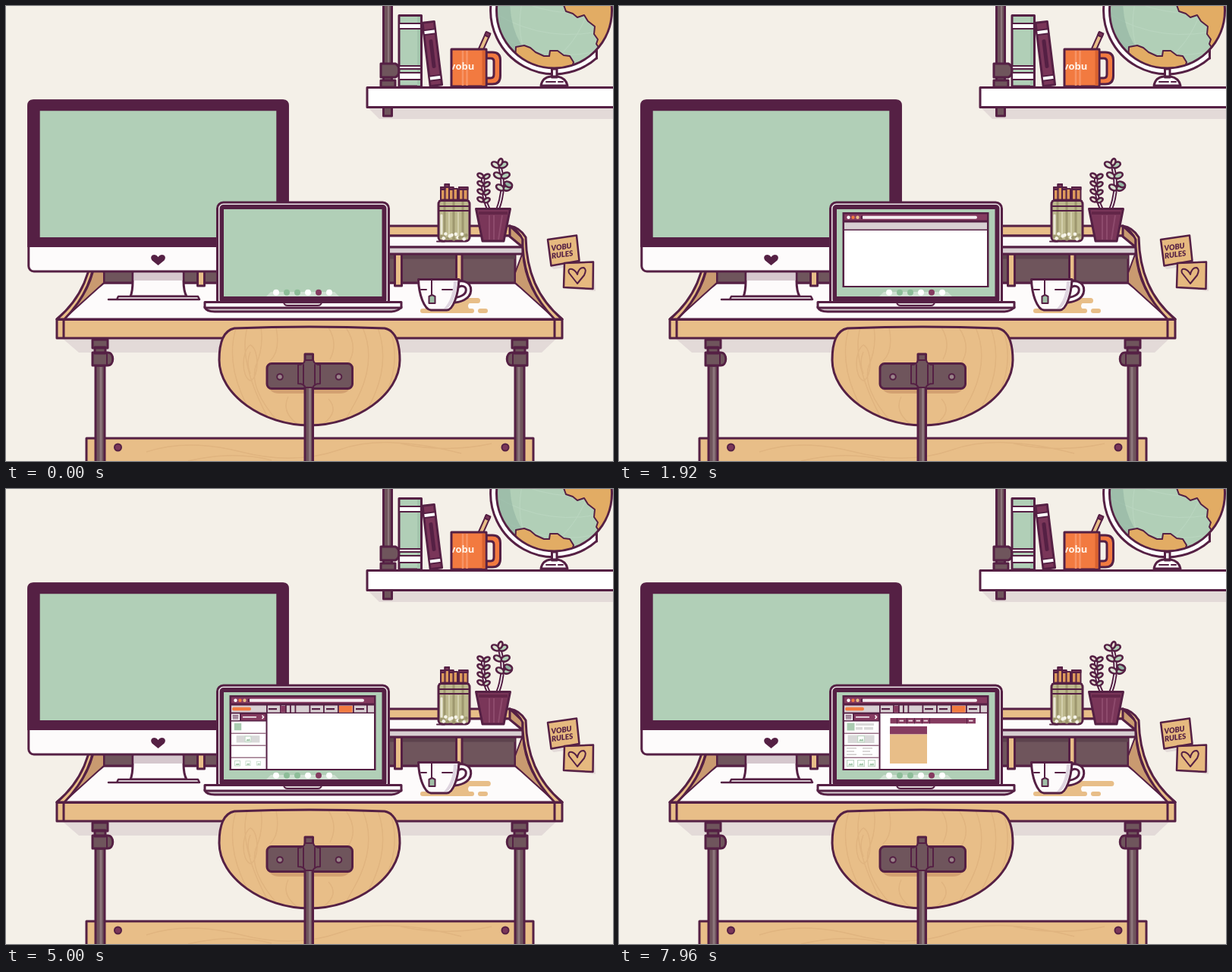
These frames come from a looping animation (800 px wide and 600 px high, 8000 ms). An HTML page:

```html
<!DOCTYPE html>
<html lang="en">
<head>
<meta charset="utf-8">
<title>Desk</title>
<style>
html, body { margin: 0; width: 100%; height: 100%; overflow: hidden; background: #f4f0e8; }
svg { display: block; width: 100vw; height: 100vh; }
.o { stroke: #552044; stroke-width: 3; stroke-linejoin: round; stroke-linecap: round; }
.t { stroke: #552044; stroke-width: 2; stroke-linejoin: round; stroke-linecap: round; }
.d { fill: #552044; }
.w { fill: #fff; }
.c { fill: #fdfbfb; }
.g { fill: #b1cfb7; }
.n { fill: #e8be88; }
.note { fill: #e6b97f; stroke-width: 2.5; }
.s { fill: #c99a70; }
.b { fill: #6f555c; }
.p { fill: #853b60; }
.q { fill: #7a3659; }
.r { fill: #f27a40; }
.e { fill: #d8cfd2; }
.sh { fill: #e3dad8; }
.l { fill: none; }
.grain { fill: none; stroke: #e0b47f; stroke-width: 1.5; }
.anim { transform-box: fill-box; transform-origin: 0 50%; }
.mid { transform-origin: 50% 50%; }
.top { transform-origin: 50% 0; }
</style>
</head>
<body>
<svg viewBox="0 0 800 600">
<defs>
  <clipPath id="globeClip"><circle cx="722.5" cy="6" r="76"/></clipPath>
  <clipPath id="mugClip"><rect x="588.5" y="59" width="43" height="46"/></clipPath>
  <clipPath id="seatClip"><path id="seat" d="M301 425Q400 421 499 425C514 428 519 445 519 467C519 512 462 553 400 553C338 553 281 512 281 467C281 445 286 428 301 425Z"/></clipPath>
  <path id="ring" d="M641.4 -8.3A82.500 82.500 0 0 0 778.3 66.7"/>
  <path id="handle" d="M592 370C599 363 610 366 609.500 375C609 384 598 388 587 388"/>
  <path id="stems" d="M636 268Q627 250 629 222M648 268Q660 238 649 206"/>
  <g id="leg">
    <path class="b o" d="M118 474H130V604H118Z"/>
    <path d="M125 476V600" stroke="#8d777c" stroke-width="3"/>
    <path class="b o" d="M117 450H131V458H117ZM114 440H134V451H114ZM114 457H134C143 457 143 474 134 474H114Z"/>
    <path class="t l" d="M133 458V473"/>
  </g>
  <g id="side">
    <path class="s t" d="M681 325L671 352V365L724 413C697 388 683 358 681 325Z"/>
    <path class="s o" d="M664 290L681 306V318L664 304Z"/>
    <path class="n o" d="M664 290Q677 292 685 305C686 350 700 385 733 413H723C696 385 683 355 681 317V308Q676 297 664 290Z"/>
  </g>
  <g id="pic">
    <rect width="10" height="9.5" fill="#c2d8c6"/>
    <rect x="1.2" y="1.2" width="7.6" height="7.1" fill="#fff"/>
    <path d="M2 7.5L4 4.5L5.5 6L7 4L8.3 7.5Z" fill="#9dc4a5"/>
  </g>
</defs>
<rect width="800" height="600" fill="#f4f0e8"/>

<!-- wall shelf -->
<path class="sh" d="M477 134H800V149H492Z"/>
<path class="b o" d="M497.5 -4H508.5V145H497.5Z"/>
<path d="M504 0V76" stroke="#8d777c" stroke-width="2"/>
<path class="b o" d="M494 76H513Q518 78 518 85T513 94H494ZM494 98H513V107H494Z"/>
<path class="w o" d="M476 107.5H806V133.5H476Z"/>

<!-- books -->
<path class="g o" d="M518 12.5H547.5V106H518Z"/>
<path d="M544 14V105" stroke="#a3c5ac" stroke-width="4"/>
<path class="w t" d="M518 23H547V30H518ZM518 79H547V83H518ZM518 88H547V97H518Z"/>
<g transform="rotate(-7 562 63)">
  <path class="q o" d="M554 21H569.5V105H554Z"/>
  <path class="w t" d="M554 31H569.5V37H554ZM554 92H569.5V98H554Z"/>
  <rect class="d" x="559.5" y="44" width="5" height="38" rx="2"/>
</g>

<!-- mug -->
<g transform="rotate(24 630 48)">
  <path class="n t" d="M627 35H633V60H627Z"/><path class="q t" d="M627 34H633V39H627Z"/>
</g>
<path class="r o" d="M633 61H641Q651.5 61 651.5 71V92Q651.5 103 641 103H633V95H639Q643 95 643 90V73Q643 69 639 69H633Z"/>
<path class="r o" d="M587 57H633V106H587Z"/>
<path d="M602 59V105M607.5 59V105" stroke="#f79465" stroke-width="2.500"/>
<path d="M629.500 59V105" stroke="#d9622f" stroke-width="4"/>
<text x="585" y="84" clip-path="url(#mugClip)" font-family="'Open Sans', sans-serif" font-weight="700" font-size="13" fill="#fff3e8">vobu</text>

<!-- globe -->
<use href="#ring" class="l" stroke="#552044" stroke-width="6"/>
<use href="#ring" class="l" stroke="#fff" stroke-width="7" transform="translate(722.5 6) scale(.96) translate(-722.5 -6)"/>
<path class="o l" d="M778.5 58V69"/>
<g clip-path="url(#globeClip)">
  <rect class="g" x="640" y="-80" width="165" height="165"/>
  <g class="l" stroke="#bad6c0">
    <ellipse cx="722" cy="-15" rx="44" ry="92" transform="rotate(18 722 4)"/>
    <path d="M645 10Q715 52 798 30M650 -20Q720 22 800 4M665 47Q725 75 785 58"/>
  </g>
  <path d="M640 -10V90H735Q664 70 664 -10Z" fill="#92b4a2" opacity=".6"/>
  <path class="t" fill="#e2ac64" d="M734 -4L738 7L747 10L753 15L762 12L767 20L776 27L775 37L780 44L778 50L782 56L810 40V-4ZM672 54L683 52L691 55L698 61L709 66L716 66L717 59L727 59L735 65L743 66L748 74L744 88H670Z"/>
  <path d="M735 82Q788 70 799 5V82Z" fill="#d59b56" opacity=".3"/>
</g>
<circle class="o l" cx="722.5" cy="6" r="76"/>
<path class="w o" d="M719.500 83H726V94H719.500ZM705 105Q707 94 718 93H727Q738 95 740 105Z"/>
<path class="t l" d="M712 100H724M728 100H734"/>

<!-- desk frame -->
<path class="sh" d="M74 438H726L706 457H96Z"/>
<path class="n o" d="M106 570H695V606H106Z"/>
<path class="grain" d="M185 588Q240 570 310 588T440 585T600 590M240 600Q300 586 350 599M520 577Q580 590 640 577"/>
<circle class="q t" cx="147.500" cy="582" r="4.500"/><circle class="q t" cx="658" cy="582" r="4.500"/>
<use href="#leg"/><use href="#leg" transform="matrix(-1 0 0 1 801 0)"/>

<!-- desk -->
<path class="c o" d="M67 413L129 365H671L733 413Z"/>
<path class="n o" d="M400 290H664L674 303H400Z"/>
<path class="c o" d="M400 303H665L681 318H400Z"/>
<path class="b o" d="M129 327H671V365H129Z"/>
<path d="M129 331H671" stroke="#5d434d" stroke-width="5"/>
<path class="n o" d="M252.500 327H261.500V369H252.500ZM512.500 327H521.500V369H512.500ZM593.500 327H601V362H593.500Z"/>
<path class="e o" d="M400 318H681V327H400Z"/>
<use href="#side"/><use href="#side" transform="matrix(-1 0 0 1 800 0)"/>
<path class="n o" d="M67 413.500H733V438H67ZM76 414V438M723 414V438"/>

<!-- monitor -->
<path class="c o" d="M167 350V362Q167 376 164 383H238Q234 376 234 362V350Z"/>
<path d="M168.500 351H232.500V362H168.500Z" fill="#d5c7cd"/>
<path class="c o" d="M148 383H253L255 387H146ZM135 387H146" style="stroke-width:2.500"/>
<rect class="c o" x="29.800" y="125" width="341.500" height="225" rx="7"/>
<path class="d" d="M28.200 318V131Q28.200 123.300 36 123.300H365Q372.800 123.300 372.800 131V318Z"/>
<path class="g" d="M44.700 138.300H356.300V305H44.700Z"/>
<path class="d" d="M200.500 342L192.500 335.500Q189.500 331 193 328.500Q197.500 326.500 200.500 331Q203.500 326.500 208 328.500Q211.500 331 208.500 335.500Z"/>

<!-- pencil jar -->
<path class="t" d="M568 310.500H578"/>
<path class="t" fill="#dd9a5c" d="M573 239H578.500V258H573ZM578.500 235H584V258H578.500ZM584 239H589.500V258H584ZM589.500 241H595V258H589.500ZM597 239H602.500V258H597ZM602.500 239H608.500V258H602.500Z"/>
<path class="q t" d="M573 239H578.500V242H573ZM578.500 235H584V239H578.500ZM584 239H589.500V242H584ZM597 239H608.500V242H597Z"/>
<rect class="o" x="570" y="256" width="41" height="54" rx="5" fill="#bdb88d"/>
<path d="M578 258V306M590 258V306M602 258V306" stroke="#9e976f" stroke-width="3"/>
<path d="M584 272V305M596 272V305" stroke="#d3cfac" stroke-width="2"/>
<path d="M574 276V300" stroke="#e9e7d5" stroke-width="3" stroke-linecap="round"/>
<g id="pebbles"></g>
<path class="t l" d="M571 257H610M571 264H610M571 270H610"/>

<!-- plant -->
<use href="#stems" class="l" stroke="#552044" stroke-width="5.500"/>
<use href="#stems" class="l" stroke="#fff" stroke-width="1.500"/>
<g id="leaves"></g>
<path class="q o" d="M619.500 267.500H664.500L656 310H628Z"/>
<path d="M654 276L649 308M643 276V308M637 276V308" stroke="#8d4a6c" stroke-width="2"/>
<path d="M623 273H661" stroke="#632648" stroke-width="4"/>

<!-- notes -->
<path class="sh" d="M718 344L757 338V342L722 347ZM738 373L777 376L775 340Z"/>
<path class="o note" d="M714 308L752 302.500L755.500 336L718.500 342.500Z"/>
<g class="d" transform="rotate(-8 734 322)" font-family="Lato, sans-serif" font-weight="900" font-style="italic" font-size="10">
  <text x="719" y="321">VOBU</text><text x="718" y="331">RULES</text>
</g>
<path class="o note" d="M736 339L774 337.500L773.500 373L735 371Z"/>
<path class="t l" d="M753 366L742 352Q740 346 746 347Q751 349 753 354Q755 345 761 345Q766 347 762 355Z"/>

<!-- spill and cup -->
<g class="n">
  <rect x="546" y="399" width="71" height="6" rx="3"/>
  <rect x="622" y="399" width="13" height="6" rx="3"/>
  <path d="M570 391H613Q609 392 609 395.500T613 400H570Z"/>
  <rect id="spill" x="580" y="385" width="45" height="7" rx="3.500"/>
</g>
<use href="#handle" class="l" stroke="#552044" stroke-width="9.500"/>
<use href="#handle" class="l" stroke="#fff" stroke-width="3.500"/>
<path class="c o" d="M543.500 360.500H597C596 382 589 401 581 401H560C551 400 544 380 543.500 360.500Z"/>
<path d="M590 363Q589 387 577 399H581Q592 392 595 363Z" fill="#dfd5e0"/>
<path class="t l" d="M561 361V381M547 374H554M575 374H588"/>
<path class="t" fill="#9fbfa6" d="M557.500 383L561.500 381L565.500 383V392H557.500Z"/>

<!-- laptop -->
<rect class="o" x="278.500" y="259" width="226" height="140" rx="8" fill="#efe9eb"/>
<rect class="d" x="281.500" y="262" width="220" height="130" rx="5"/>
<path class="g" d="M287 268H495.500V383H287Z"/>
<path d="M343 383L349 377H433L439 383Z" fill="#cfe0d2"/>
<g id="dock"></g>
<g id="win">
  <rect class="d" x="294.500" y="272" width="193" height="99"/>
  <rect class="p" x="297" y="274.500" width="188" height="8"/>
  <circle class="w" cx="302.500" cy="278.800" r="2.200"/><circle class="r" cx="308.500" cy="278.800" r="2.200"/><circle class="n" cx="314.500" cy="278.800" r="2.200"/>
  <rect x="320" y="276.800" width="152" height="4" rx="2" fill="#f5eef1"/>
  <rect class="d" x="319" y="276.500" width="2" height="4.500"/>
  <rect class="e" x="297" y="285.500" width="188" height="9"/>
  <rect class="w" x="297" y="296" width="188" height="73"/>
  <g id="nav"></g>
  <rect id="pill" class="r anim mid" x="298" y="287.700" width="25" height="4.600" rx="2.300"/>
  <g id="panel">
    <rect id="edge" class="d anim top" x="342.500" y="295" width="2" height="75"/>
    <g id="head" class="anim">
      <rect class="d" x="296" y="295.500" width="47" height="11"/>
      <rect class="w" x="297" y="296.500" width="11" height="8.500"/>
      <path class="t" d="M299 298.500H306M299 300.700H306M299 303H306" style="stroke-width:1.200"/>
      <rect class="p" x="310" y="297" width="32" height="8"/>
      <path class="l" d="M312 300.700H330M337.500 298.500L339.500 300.700L337.500 303" stroke="#fff" stroke-width="1.500"/>
    </g>
    <g fill="#9b7489">
      <rect class="anim rule" x="297" y="321.500" width="46" height="1.500"/>
      <rect class="anim rule" x="297" y="337.500" width="46" height="1.500"/>
      <rect class="anim rule" x="297" y="353.500" width="46" height="1.500"/>
    </g>
    <rect class="anim mid item" x="300.500" y="308.500" width="10" height="10" fill="#a9cbb0"/>
    <g class="anim mid item">
      <rect x="301.500" y="324.500" width="35" height="10.500" fill="#d9d9d9"/><use href="#pic" x="314" y="325"/>
    </g>
    <g class="anim mid item"><use href="#pic" x="300" y="357"/></g>
    <g class="anim mid item"><use href="#pic" x="314" y="357"/></g>
    <g class="anim mid item"><use href="#pic" x="328" y="357"/></g>
    <g id="lines"></g>
  </g>
  <rect id="bar" class="p anim" x="357.500" y="302" width="112.500" height="7.300"/>
  <g id="ticks"></g>
  <rect id="cardTop" class="p anim" x="357" y="313" width="49" height="10.500"/>
  <rect id="card" class="n anim top" x="357" y="323.500" width="49" height="38.500"/>
</g>
<path class="e o" d="M262 397H521Q517 403 506 403H275Q264 403 262 397Z"/>
<path class="c o" d="M262 390.500H521V398H262Z"/>
<path class="e t" d="M366 391H416Q415 395 411 395H371Q367 395 366 391Z"/>

<!-- chair -->
<use href="#seat" class="n"/>
<g class="grain" clip-path="url(#seatClip)">
  <path d="M303 425Q288 475 322 535M318 424Q305 470 348 548M336 424Q340 450 329 475Q320 505 360 550M322 447C310 455 310 489 322 494C334 490 334 452 322 447ZM322 456Q316 470 322 485M356 424Q362 455 348 468M372 515Q362 535 385 552M425 424Q438 445 427 466M448 424Q465 450 451 471M470 424Q490 470 459 525L445 550M490 424Q510 480 470 542M508 432Q522 480 490 532M425 518Q440 535 418 551"/>
</g>
<use href="#seat" class="o l"/>
<path d="M347 505H453Q449 511 440 511H360Q351 511 347 505Z" fill="#d3a171"/>
<rect class="b o" x="344" y="471.500" width="112.500" height="33" rx="6"/>
<path class="b o" d="M394 459H404.500V606H394Z"/>
<path d="M400.500 504V600" stroke="#8d777c" stroke-width="3"/>
<path class="b t" d="M385 473Q393 473 394 467H405Q406 473 414 473V498Q406 498 404.500 503H394.500Q393 498 385 498Z"/>
<path class="t l" d="M392 473V500M407 473V500"/>
<circle class="t" cx="361" cy="489" r="3.800" fill="#9a858a"/><circle class="t" cx="438.500" cy="489" r="3.800" fill="#9a858a"/>
</svg>
<script>
const LOOP = 8000;
const $ = id => document.getElementById(id);
const all = sel => [...document.querySelectorAll(sel)];

function add(parent, tag, attrs) {
  const el = document.createElementNS('http://www.w3.org/2000/svg', tag);
  for (const k in attrs) el.setAttribute(k, attrs[k]);
  return $(parent).appendChild(el);
}
const box = (parent, x, y, width, height, cls, fill) =>
  add(parent, 'rect', fill ? { x, y, width, height, class: cls, fill } : { x, y, width, height, class: cls });

// dock icons
const icons = ['#fff', '#8dbd98', '#8dbd98', '#fff', '#853b60', '#fff'].map((fill, i) =>
  add('dock', 'circle', { cx: 356 + i * 14, cy: 377.7, r: 4, fill }));

// pebbles
for (let i = 0; i < 13; i++)
  add('pebbles', 'circle', { cx: 574 + i * 2.7, cy: 304 + 3.5 * Math.sin(i * 2.4), r: 2.3,
    fill: i % 3 ? '#f5f3e8' : '#9e976f' });

// leaves in pairs along both stems
function leaf(x, y, angle, fill, size) {
  add('leaves', 'ellipse', { cx: size, cy: 0, rx: size, ry: size * .62, class: 'o', fill,
    style: 'stroke-width:2.6', transform: `translate(${x} ${y}) rotate(${angle})` });
}
for (let i = 0; i < 4; i++) {
  leaf(629, 226 + i * 10.5, 212, '#e9dcd2', 4.3);
  leaf(630, 227 + i * 10.5, -32, '#c9d8c4', 4.3);
}
for (const [x, y] of [[650, 212], [653, 226], [656, 242]]) {
  leaf(x, y, 208, '#d9e2d2', 5.5);
  leaf(x, y, -25, '#b1cfb7', 5.8);
}
leaf(650, 210, -70, '#e9dcd2', 4.5);
leaf(657, 233, 25, '#92b4a2', 5.5);

// browser toolbar
for (const x of [343, 361, 368, 374, 380.5, 399.5, 418, 437, 457, 475])
  box('nav', x, 285, 1.8, 10, 'd anim mid nav');
box('nav', 362, 286, 6, 8.5, 'p anim mid nav');
for (const x of [346, 403, 422, 461]) box('nav', x, 289, 11, 2.2, 'd anim mid nav');
box('nav', 439, 286, 17.5, 8.5, 'r anim mid nav');

// panel copy
for (const [x, y, w, h] of [[312, 309, 20, 3], [332, 309, 4, 3], [312, 314, 9, 3.5], [323, 314, 12, 3.5]])
  box('lines', x, y, w, h, 'anim line', '#d9d9d9');
for (const x of [300, 321])
  for (let i = 0; i < 3; i++) box('lines', x, 341 + i * 4.2, 13 - i % 2 * 3, 1.5, 'anim line', '#cfcaca');

// page menu
for (const x of [366, 379, 389, 399, 409, 458]) box('ticks', x, 302, 1, 7.3, 'd anim mid split');
for (const x of [369.5, 381.5, 391.5, 401.5, 461]) box('ticks', x, 304.7, 5.5, 1.8, 'anim mid dash', '#f1dfe6');

// selector, start, duration, delay between items, axis
const steps = [
  ['.nav', 2440, 240, 16, 'Y'],
  ['#pill', 2720, 800, 0, 'X'],
  ['#edge', 3320, 500, 0, 'Y'],
  ['#head', 3480, 720, 0, 'X'],
  ['.rule', 3800, 500, 120, 'X'],
  ['.item', 4300, 820, 60, ''],
  ['.line', 5020, 380, 40, 'X'],
  ['#bar', 5820, 400, 0, 'X'],
  ['.split', 6060, 160, 15, 'Y'],
  ['.dash', 6680, 260, 80, 'X'],
  ['#cardTop', 7040, 420, 0, 'X'],
  ['#card', 7440, 440, 0, 'Y']
].map(([sel, ...rest]) => [all(sel), ...rest]);

const clamp = v => Math.max(0, Math.min(1, v));
const ease = p => p * p * (3 - 2 * p);

function draw(t) {
  const s = t < 480 ? 0 : Math.max(.006, clamp((t - 480) / 1360) ** 4.5);
  $('win').setAttribute('transform', `translate(370.5 371) scale(${s}) translate(-370.5 -371)`);
  $('win').style.visibility = s ? 'visible' : 'hidden';
  icons[1].setAttribute('cy', 377.7 - 3.5 * Math.sin(Math.PI * clamp((t - 800) / 800)) ** 2);
  $('spill').setAttribute('width', 45 + Math.max(0, t - 2000) * .0046);
  for (const [els, start, dur, gap, axis] of steps)
    els.forEach((el, i) => {
      el.style.transform = `scale${axis}(${ease(clamp((t - start - i * gap) / dur))})`;
    });
}

const began = performance.now();
function tick() {
  draw((performance.now() - began) % LOOP);
  requestAnimationFrame(tick);
}
draw(0);
tick();
</script>
</body>
</html>
```
